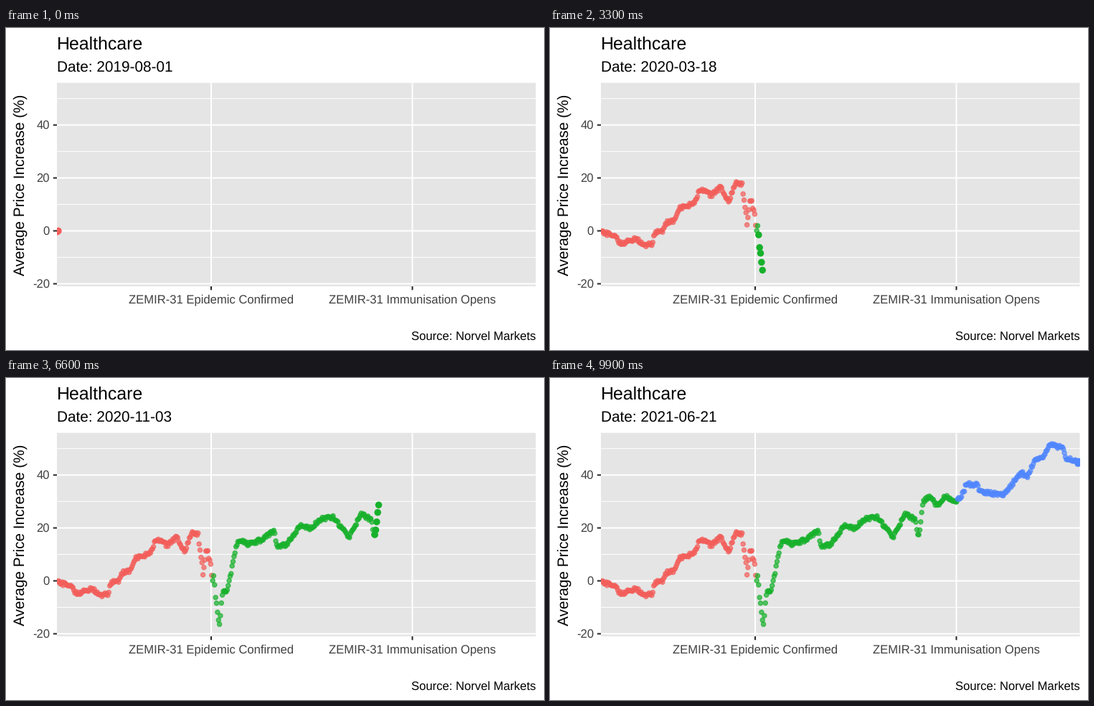
A matplotlib script for the animation above (10 s loop, 750x450 px).

```python
import numpy as np
import matplotlib.pyplot as plt
from matplotlib.animation import FuncAnimation
from matplotlib.colors import to_rgba_array
from matplotlib.patches import Rectangle

W, H, DPI = 750, 450, 100
FRAMES, SPAN = 100, 690
START = np.datetime64("2019-08-01")
RED, GREEN, BLUE = "#F35E5A", "#17B12B", "#5086FF"
LEFT, RIGHT, TOP, BOTTOM = 71, 738.5, 76.7, 361
EVENTS = {286: "ZEMIR-31 Epidemic Confirmed",
          566.5: "ZEMIR-31 Immunisation Opens"}

plt.rcParams["font.family"] = "Liberation Sans"
plt.rcParams["text.hinting"] = "none"


def pt(px):
    return px * 72 / DPI


def y_of(pct):
    return 283.5 - 3.698 * pct


# One dot per weekday, each first shown in the frame nearest its date
days = np.arange(SPAN + 1)
days = days[np.is_busday(START + days)]
shown_at = np.round(days * (FRAMES - 1) / SPAN).astype(int)
x = np.linspace(71.6, 737.4, len(days))

# Main turning points as (x, percent), joined by lines with daily jitter
turns = [
    (72, -.5), (91, -1.8), (96, -4.8), (109, -4), (120, -2.6), (130, -5.6),
    (143, -4.8), (145, -1), (157, 0), (161, 2.9), (175, 4), (179, 8.3),
    (200, 10.4), (209, 15.3), (218, 15), (224, 13.3), (238, 16.7),
    (249, 10.8), (259, 18), (268, 17.3), (275, 2), (279, 11.5), (286, 6.8),
    (287.5, 0), (289, 2), (297.3, -17.5), (302, -4.3), (309, -3.2),
    (323, 15.5), (331, 15.2), (338, 13.8), (356, 15.5), (374, 19),
    (378, 12.5), (392, 14), (411, 21.2), (424, 19.9), (440, 23.4),
    (456, 24.2), (478, 16.3), (495, 25.3), (509, 23), (514, 16.5),
    (520, 29.8), (530, 32.3), (540, 28), (550, 32.2), (566, 29.7),
    (577, 33.4), (580, 36.6), (596, 36.3), (598, 33.8), (632, 32.3),
    (657, 41), (665, 39.3), (676, 45.5), (687, 46.5), (697, 51.5),
    (715, 50.3), (719, 46.4), (738, 44.5)]
jitter = np.random.default_rng(7).uniform(-.7, .7, len(x))
swing = 1 + 1.2 * np.exp(-((x - 282) / 11) ** 2)
pct = np.interp(x, *np.transpose(turns)) + jitter * swing

points = np.column_stack([x, y_of(pct)])
phase = np.digitize(x, [286.8, 567.2])
colors = to_rgba_array([RED, GREEN, BLUE])[phase]

# Stage
fig = plt.figure(figsize=(W / DPI, H / DPI), dpi=DPI, facecolor="white")
ax = fig.add_axes([0, 0, 1, 1])
ax.set(xlim=(0, W), ylim=(H, 0))
ax.axis("off")

panel = Rectangle((LEFT, TOP), RIGHT - LEFT, BOTTOM - TOP, fc="#E5E5E5",
                  lw=0, snap=False)
ax.add_patch(panel)


def line(xs, ys, width, color="white"):
    ax.plot(xs, ys, color=color, lw=pt(width), solid_capstyle="butt",
            snap=False, zorder=1.5)


def label(px, py, text, size, color="black", **kw):
    return ax.text(px, py, text, fontsize=pt(size), color=color,
                   va="baseline", **kw)


for v in range(-10, 51, 20):
    line([LEFT, RIGHT], [y_of(v)] * 2, 1)
for v in range(-20, 41, 20):
    line([LEFT, RIGHT], [y_of(v)] * 2, 2)
    line([LEFT - 5.2, LEFT], [y_of(v)] * 2, 2, "#262626")
    label(60.8, y_of(v) + 5.9, str(v), 16.6, "#404040", ha="right")
for ex, name in EVENTS.items():
    line([ex, ex], [TOP, BOTTOM], 2)
    line([ex, ex], [BOTTOM, BOTTOM + 5.2], 2, "#262626")
    label(ex, 384, name, 16.6, "#404040", ha="center")

label(70.8, 30, "Healthcare", 24.9)
date = label(70.8, 61, "", 20.75)
label(26, 219, "Average Price Increase (%)", 20.75, ha="center",
      rotation=90, rotation_mode="anchor")
label(738.5, 436, "Source: Norvel Markets", 16.6, ha="right")


def dots(radius, alpha, z):
    d = ax.scatter([], [], s=pt(2 * radius) ** 2, lw=pt(1.33),
                   alpha=alpha, zorder=z)
    d.set_clip_path(panel)
    return d


past = dots(3.1, 0.7, 3)
now = dots(4.1, 1, 4)


def update(f):
    for d, mask in ((past, shown_at < f), (now, shown_at == f)):
        d.set_offsets(points[mask])
        d.set_color(colors[mask])
    date.set_text(f"Date: {START + f * SPAN // (FRAMES - 1)}")
    return past, now, date


anim = FuncAnimation(fig, update, frames=FRAMES, interval=100, repeat=True)
plt.show()
```
